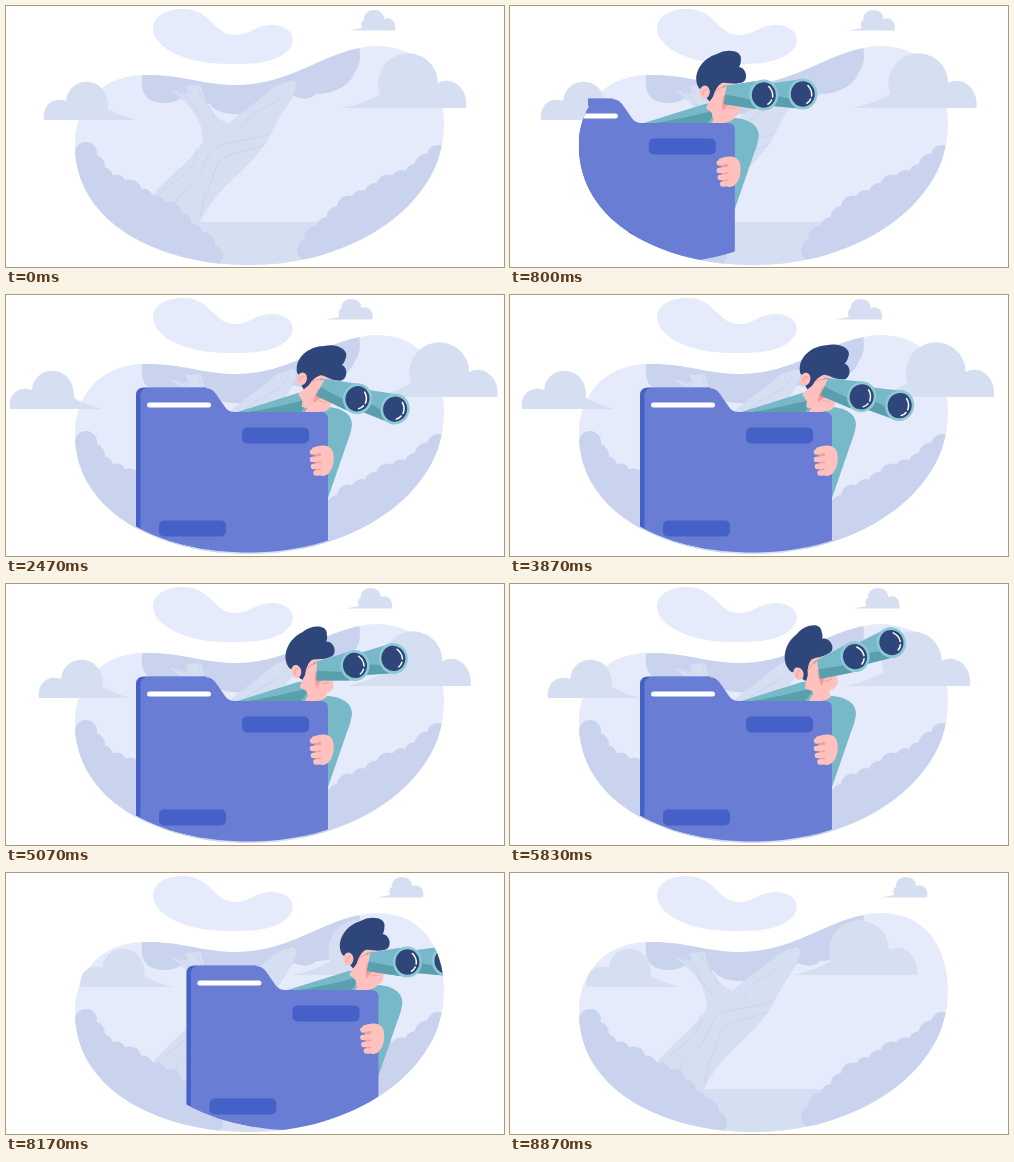
Recreate the animation shown at these times as an HTML page. Size 498 by 261 pixels, loop 9.01 s.

```html
<!DOCTYPE html>
<html lang="en">
<head>
<meta charset="utf-8">
<title>Searching</title>
<style>
  html, body { margin: 0; width: 100%; height: 100%; overflow: hidden; background: #fff; }
  svg { display: block; width: 100vw; height: 100vh; }
  .pale { fill: #e5ebfa; }
  .cloud { fill: #d6dff1; }
  .leaf { fill: #c9d3ee; }
  .front { fill: #687dd3; }
  .deep { fill: #4561c8; }
  .teal { fill: #77b9c8; }
  .shade { fill: #5a9fae; }
  .rim { fill: #8ccad4; }
  .skin { fill: #ffc1bd; }
  .rose { fill: #f99a9b; }
  .navy { fill: #2f467b; }
  .line { fill: none; stroke-linecap: round; }
  .bark { stroke: #c9d3ee; stroke-width: 1; }
  .blush { stroke: #f99a9b; stroke-width: 1; }
  .finger { stroke: #ffc1bd; stroke-width: 5.6; }
  .glint { stroke: #fff; stroke-width: 1.5; }
</style>
</head>
<body>
<svg viewBox="0 0 498 261" xmlns="http://www.w3.org/2000/svg">
  <defs>
    <path id="land" d="M69 135C70 105 90 70 137 69C175 68 195 79 232 79C287 79 323 41 371 40C418 40 438 78 438 118C438 200 345 259 245 259C150 259 66 215 69 135Z"/>
    <path id="sky" d="M78 0H418V100H78Z"/>
    <clipPath id="inLand"><use href="#land"/></clipPath>
    <clipPath id="openTop"><use href="#land"/><use href="#sky"/></clipPath>
    <!-- the figure's own rounded base, just above the land's edge -->
    <clipPath id="base"><use href="#land" y="-1.500"/><use href="#sky"/></clipPath>
    <g id="lens">
      <ellipse class="rim" rx="14.500" ry="15.500"/>
      <ellipse class="navy" rx="12" ry="12.700"/>
      <path class="line glint" d="M5 -8.500Q9.500 -4 8.800 2M7.800 5Q6.500 8 4 9.200"/>
    </g>
  </defs>

  <path class="pale" d="M147 22C147 8 165 2 180 3C205 5 208 28 228 29C245 29 250 18 268 19C285 20 291 33 284 42C272 58 245 58 222 58C180 58 147 42 147 22Z"/>
  <use href="#land" class="pale"/>

  <g clip-path="url(#inLand)">
    <path class="leaf" d="M136 60V80C138 95 150 97 160 97C172 97 178 88 186 90C192 94 198 97 204 98C208 106 222 109 238 108C255 108 268 100 274 95C280 97 285 92 288 90C296 93 303 95 310 88C330 88 345 78 349 66C355 58 355 48 352 36Z"/>
    <path class="cloud" d="M175 216H325V261H175Z"/>
    <path class="cloud" d="M164 84L182 88L180 80L195 79C198 96 206 110 222 118C234 107 250 97 270 80L286 74L291 77C288 95 275 105 264 130C255 148 235 165 220 180C208 192 198 206 194 217L150 222L138 198C165 168 190 150 197 135C196 112 184 98 164 84Z"/>
    <path class="line bark" d="M172 86C190 92 186 108 203 122M192 82C194 95 206 98 208 112M283 82C268 104 240 104 234 124M190 143C194 165 168 172 152 190M262 128C240 138 208 132 201 152C196 172 178 182 168 198M258 139C236 148 214 146 209 164C205 180 196 190 195 210"/>
    <g id="bushes" class="leaf"></g>
  </g>

  <path id="cloudLeft" class="cloud" d="M38 114C36 100 46 90 60 95C62 68 104 68 102 103Q112 109 130 114Z"/>
  <path id="cloudRight" class="cloud" d="M336 102Q360 97 374 88A30 30 0 1 1 432 77C447 69 463 84 460 102Z"/>
  <path id="cloudTop" class="cloud" d="M343 24.500L356 22Q354 15 358 14C357 1 378 1 378 13C385 10 391 16 389 24.500Z"/>

  <g clip-path="url(#openTop)">
    <g id="actor" clip-path="url(#base)">
      <path class="teal" d="M296 114C320 109 346 112 346 130Q345 138 341 148L322 203H296Z"/>
      <path class="skin" d="M296 108L318 104L321 113Q314 119 293 118Z"/>
      <path class="teal" d="M228 118L292 98Q304 96 307 104L298 118Z"/>
      <path class="shade" d="M236 118Q275 112 306 103L294 118Z"/>

      <g id="head">
        <path class="teal" d="M360 77L390 73V103L360 100Z"/>
        <path class="shade" d="M360 89L383 94V102L360 100Z"/>
        <use href="#lens" x="390" y="88"/>
        <path class="skin" d="M297 80L309 74L327 82V103C327 111 320 113 312 112L300 113L297 95Z"/>
        <path class="navy" d="M286 82C278 68 290 52 304 48C314 42 330 44 328 54Q328 59 326 61C335 62 336 77 327 77C320 79 314 76 309 77C304 80 301 86 299 96C296 96 293 92 290 84Z"/>
        <ellipse class="skin" cx="292" cy="86" rx="5" ry="6.500"/>
        <path class="line blush" d="M290 89Q290 83 294 83.500M302 86Q307 81 314 80M315 102H322"/>
        <path class="rose" d="M309 97H321Q314 98 310 106Z"/>
        <path class="teal" d="M310 80L350 74V104L310 98Z"/>
        <path class="shade" d="M310 88L340 94L343 103L310 98Z"/>
        <use href="#lens" x="351" y="89"/>
        <path class="skin" d="M314 80C305 84 298 92 293 102L303 110Q310 105 311 94Z"/>
        <path class="line blush" d="M311 90Q309 96 310 103"/>
      </g>

      <path class="deep" d="M130 262V100Q130 92.500 138 92.500H200V262Z"/>
      <path class="front" d="M134.500 262V101Q134.500 93 142 93H199Q206 93 210 99L219 112Q222 117 229 117H315Q322 117 322 124V262Z"/>
      <rect x="141" y="107.500" width="64" height="5" rx="2.500" fill="#fff"/>
      <rect class="deep" x="236" y="132.500" width="67" height="16" rx="5"/>
      <rect class="deep" x="153" y="225.500" width="67" height="16" rx="5"/>

      <path class="rose" d="M308 158H318V180H310Z"/>
      <path class="skin" d="M306 153C315 149 326 149 327.500 159C329 171 324 182 315 181V158H306Z"/>
      <path class="line finger" d="M306.500 157L317 154M306.500 164.500L317 163.500M307.500 171.500L317 170.500M310 178L317 177.500"/>
    </g>
  </g>
</svg>
<script>
const LOOP = 9010;
const LEG = 2870;
const el = id => document.getElementById(id);

function add(parent, tag, attributes) {
  const node = document.createElementNS("http://www.w3.org/2000/svg", tag);
  for (const name in attributes) node.setAttribute(name, attributes[name]);
  return parent.appendChild(node);
}

// A bank of leaves below a slope, with round tufts spaced along it.
function bush(slope, corner) {
  const line = add(el("bushes"), "path", { d: slope });
  const count = 11;
  for (let i = 0; i <= count; i++) {
    const { x, y } = line.getPointAtLength(line.getTotalLength() * i / count);
    add(el("bushes"), "circle", { cx: x, cy: y, r: 11 + 1.5 * Math.sin(i * 2) });
  }
  line.setAttribute("d", slope + corner);
}
bush("M80 147C92 190 155 180 206 250", "V262H60V147Z");
bush("M432 150C400 185 345 180 302 244", "V262H445V150Z");

const smooth = u => u * u * (3 - 2 * u);

// Eased value at time t along [time, value] keys.
function track(t, keys) {
  const next = keys.findIndex(([time]) => time > t);
  if (next < 0) return keys[keys.length - 1][1];
  if (next === 0) return keys[0][1];
  const [t0, a] = keys[next - 1], [t1, b] = keys[next];
  return a + (b - a) * smooth((t - t0) / (t1 - t0));
}

// A cloud drifts out, comes back, then moves to its end place.
const drift = (out, end, lastLeg = LEG) =>
  [[0, 0], [LEG, out], [2 * LEG, 0], [2 * LEG + lastLeg, end]];

const clouds = {
  cloudLeft: drift(-36, 39),
  cloudRight: drift(33, -53),
  cloudTop: drift(-24, 28, 2000)
};
const gaze = [[1500, 0], [2700, 18.5], [3330, 18.5], [6060, -20.5], [7000, -20.5], [8050, 0]];

// Glides in from the left, rests, then speeds off to the right.
const slide = t =>
  50 * Math.max(0, (t - 7823) / 347) ** 3 - 475 * Math.max(0, 1 - t / 1950) ** 3;

function draw(t) {
  for (const id in clouds) el(id).setAttribute("transform", `translate(${track(t, clouds[id])})`);
  el("actor").setAttribute("transform", `translate(${slide(t)})`);
  el("head").setAttribute("transform", `rotate(${track(t, gaze)} 301 98)`);
}

const start = performance.now();
function tick() {
  draw((performance.now() - start) % LOOP);
  requestAnimationFrame(tick);
}
tick();
</script>
</body>
</html>
```
